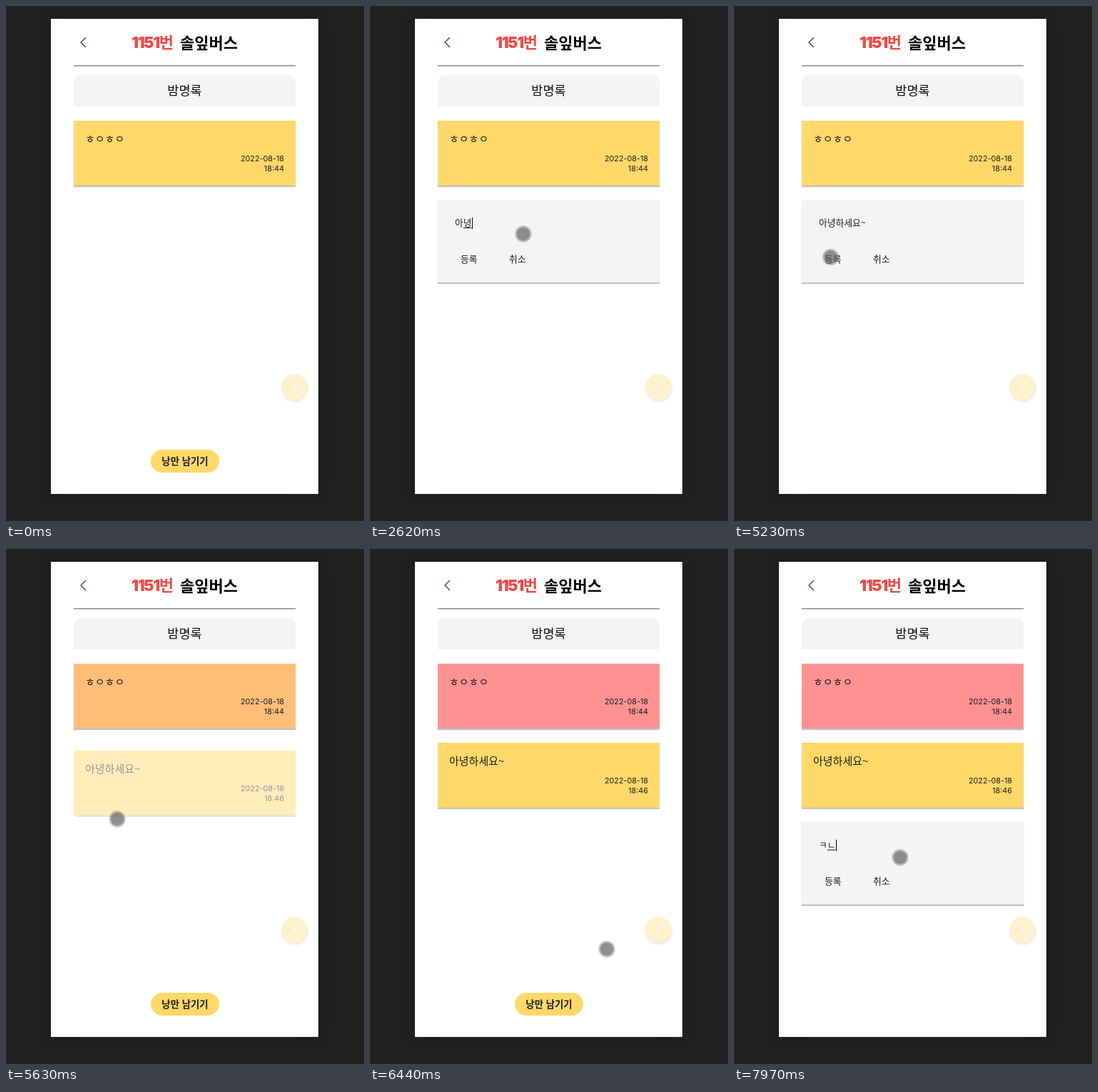
An HTML page for the animation above (8000 ms loop, 502 by 723 pixels).

```html
<!DOCTYPE html>
<html lang="ko">
<head>
<meta charset="utf-8">
<title>밤명록</title>
<style>
  :root { --yellow: #ffd869; --red: #ff9191; --grey: #f4f4f4; --ink: #1b1b24; }
  html, body { margin: 0; width: 100%; height: 100%; overflow: hidden; background: #212122; }
  body { position: relative; font-family: "Noto Sans CJK KR", sans-serif; color: var(--ink); }
  body * { position: absolute; box-sizing: border-box; white-space: pre; }
  svg { fill: none; stroke-linecap: round; stroke-linejoin: round; }

  .page { left: 63px; top: 18px; width: 375px; height: 667px; background: #fff; box-shadow: 0 0 22px #0003; }
  .back { left: 100px; top: 40px; stroke: #1d4a6b; stroke-width: 1.4; }
  .title { top: 35px; font-size: 22px; line-height: 30px; font-weight: 900; color: #000; }
  .number { left: 176px; top: 36px; color: #f04a45; letter-spacing: -1.3px; font-family: Inter, "Noto Sans CJK KR", sans-serif; }
  .name { left: 244px; }
  .rule { left: 95px; top: 83px; width: 311px; height: 2px; border-top: 1px solid #8f8f8f; background: #c2c2c2; }
  .tab { left: 95px; top: 97px; width: 311px; height: 44px; border-radius: 10px 10px 0 0; background: var(--grey);
    font-size: 17.5px; line-height: 41px; text-align: center; color: #111; }

  .card, .form { left: 95px; width: 311px; box-shadow: 0 2px 1px #00000040; }
  .card { height: 91px; background: var(--yellow); }
  .card p { left: 16px; top: 14px; margin: 0; font-size: 15px; line-height: 22px; }
  .card time { right: 16px; top: 47px; font: 10.8px/14px Inter, sans-serif; text-align: right; }
  .first { top: 161px; animation: redden 8s infinite; }
  .second { top: 272px; animation: rise 8s infinite; }

  .fab { left: 386px; top: 517px; width: 36px; height: 36px; border-radius: 50%; background: #fef1cd; box-shadow: 1px 2px 4px #0000001c; }
  .fab svg { left: 0; top: 0; stroke: #fff; stroke-width: 1.3; }
  .leave { left: 203px; top: 623px; width: 96px; height: 32px; border-radius: 16px; background: var(--yellow);
    font-size: 13.4px; line-height: 31px; font-weight: 700; text-align: center; animation: leave 8s step-end infinite; }

  .form { height: 116px; background: var(--grey); font-size: 12.8px; line-height: 20px; }
  .hint { left: 0; top: 22px; width: 100%; text-align: center; color: #9b9b9f; }
  .typed { left: 24px; top: 22px; color: #222; }
  .typed * { position: static; font-weight: 400; }
  .typed u { text-decoration: underline 1px; text-underline-offset: 2px; }
  .typed u::before, .typed b::before { content: ""; }
  .typed i { display: inline-block; width: 1px; height: 16px; margin-right: -1px; vertical-align: -4px; background: #000; }
  .ok { left: 32px; top: 73px; }
  .cancel { left: 100px; top: 73px; }

  .a { top: 272px; animation: open-a 8s infinite; }
  .a .hint { animation: hint-a 8s step-end infinite; }
  .a i { animation: caret-a 8s step-end infinite; }
  .a b::before { animation: done-a 8s step-end infinite; }
  .a u::before { animation: compose-a 8s step-end infinite; }
  .b { top: 383px; animation: open-b 8s infinite; }
  .b .hint { animation: hint-b 8s step-end infinite; }
  .b i { animation: caret-b 8s step-end infinite; }
  .b b::before { animation: done-b 8s step-end infinite; }
  .b u::before { animation: compose-b 8s step-end infinite; }

  .cursor { left: -11.5px; top: -11.5px; width: 23px; height: 23px; border-radius: 50%; border: 2px solid #8c8c8c88;
    background: #5a5a5aad padding-box; animation: move 8s linear infinite, press 8s step-end infinite; }

  @keyframes redden {
    0%, 68.5% { background: var(--yellow); animation-timing-function: ease-in-out; }
    73%, 100% { background: var(--red); }
  }
  @keyframes rise {
    0%, 68% { opacity: 0; transform: translateY(20px); animation-timing-function: ease-in-out; }
    73%, 100% { opacity: 1; transform: none; }
  }
  @keyframes leave {
    0% { opacity: 1; } 9.75% { opacity: 0; }
    67.625% { opacity: 1; } 86.5%, 100% { opacity: 0; }
  }
  @keyframes open-a {
    0%, 9.75% { opacity: 0; transform: scale(0); animation-timing-function: ease-in-out; }
    13.5% { opacity: 1; transform: scale(1); animation-timing-function: step-end; }
    67.625%, 100% { opacity: 0; transform: scale(0); }
  }
  @keyframes open-b {
    0%, 86.5% { opacity: 0; transform: scale(0); animation-timing-function: ease-in-out; }
    90.25%, 100% { opacity: 1; transform: scale(1); }
  }
  @keyframes hint-a { 0% { opacity: 1; } 26.25%, 100% { opacity: 0; } }
  @keyframes hint-b { 0% { opacity: 1; } 99.6%, 100% { opacity: 0; } }
  @keyframes caret-a {
    0% { opacity: 0; } 18.75% { opacity: 1; }
    25.125% { opacity: 0; } 26.25% { opacity: 1; }
    39.375% { opacity: 0; } 40.625% { opacity: 1; }
    53.2% { opacity: 0; } 59.5% { opacity: 1; }
    60.875%, 100% { opacity: 0; }
  }
  @keyframes caret-b { 0% { opacity: 0; } 96%, 100% { opacity: 1; } }
  @keyframes done-a {
    0% { content: ""; }
    30.625% { content: "아"; }
    40.625% { content: "아녕"; }
    43.125% { content: "아녕하"; }
    45.125% { content: "아녕하세"; }
    47%, 100% { content: "아녕하세요~"; }
  }
  @keyframes compose-a {
    0% { content: ""; }
    26.25% { content: "ㅇ"; } 27.5% { content: "아"; } 28.625% { content: "안"; }
    30.625% { content: "녀"; } 32.75% { content: "녕"; }
    40.625% { content: "ㅎ"; } 41.375% { content: "하"; } 42.25% { content: "핫"; }
    43.125% { content: "세"; } 44.125% { content: "셍"; }
    45.125% { content: "요"; }
    47%, 100% { content: ""; }
  }
  @keyframes done-b { 0% { content: ""; } 99.6%, 100% { content: "ㅋ"; } }
  @keyframes compose-b { 0% { content: ""; } 99.6%, 100% { content: "ㄴ"; } }
  @keyframes move {
    0%, 3.6% { transform: translate(414px, 740px); }
    3.875% { transform: translate(406px, 724px); }
    5% { transform: translate(340px, 676px); }
    6.5% { transform: translate(290px, 651px); }
    8%, 10.2% { transform: translate(258px, 641px); }
    11.375% { transform: translate(256px, 587px); }
    11.8% { transform: translate(250px, 543px); }
    12.625% { transform: translate(238px, 468px); }
    13.05% { transform: translate(232px, 427px); }
    13.875% { transform: translate(223px, 360px); }
    15% { transform: translate(216px, 325px); }
    16.25%, 47.8% { transform: translate(214.5px, 319.5px); }
    48.5%, 57.5% { transform: translate(214.5px, 317.5px); }
    59.5% { transform: translate(160px, 344px); }
    60.875%, 67.6% { transform: translate(135px, 352px); }
    70.375% { transform: translate(155.5px, 378.5px); }
    73% { transform: translate(157.5px, 386.5px); }
    77.5% { transform: translate(211px, 442px); }
    82% { transform: translate(391px, 620px); }
    83.5% { transform: translate(320px, 632px); }
    85%, 86.6% { transform: translate(262px, 640px); }
    87.75% { transform: translate(260px, 612px); }
    88.375% { transform: translate(258.5px, 579.5px); }
    90% { transform: translate(252px, 512px); }
    92.5% { transform: translate(239px, 450px); }
    95%, 100% { transform: translate(232.5px, 432.5px); }
  }
  @keyframes press {
    0% { background-color: #5a5a5aad; }
    64.125% { background-color: #4a4a4abf; }
    65.375%, 100% { background-color: #5a5a5aad; }
  }
</style>
</head>
<body>
  <div class="page"></div>
  <svg class="back" width="16" height="22"><path d="M11.5 4.5 5 11l6.500 6.500"/></svg>
  <div class="title number">1151번</div>
  <div class="title name">솔잎버스</div>
  <div class="rule"></div>
  <div class="tab">밤명록</div>

  <div class="card first"><p>ㅎㅇㅎㅇ</p><time>2022-08-18
18:44</time></div>
  <div class="card second"><p>아녕하세요~</p><time>2022-08-18
18:46</time></div>

  <div class="fab"><svg width="36" height="36"><path d="M15.500 13.500 20 18l-4.500 4.500"/></svg></div>
  <div class="leave">낭만 남기기</div>

  <div class="form a">
    <span class="hint">당신의 낭만을 남겨주세요.</span>
    <span class="typed"><b></b><u></u><i></i></span>
    <span class="ok">등록</span><span class="cancel">취소</span>
  </div>
  <div class="form b">
    <span class="hint">당신의 낭만을 남겨주세요.</span>
    <span class="typed"><b></b><u></u><i></i></span>
    <span class="ok">등록</span><span class="cancel">취소</span>
  </div>

  <div class="cursor"></div>
</body>
</html>
```
